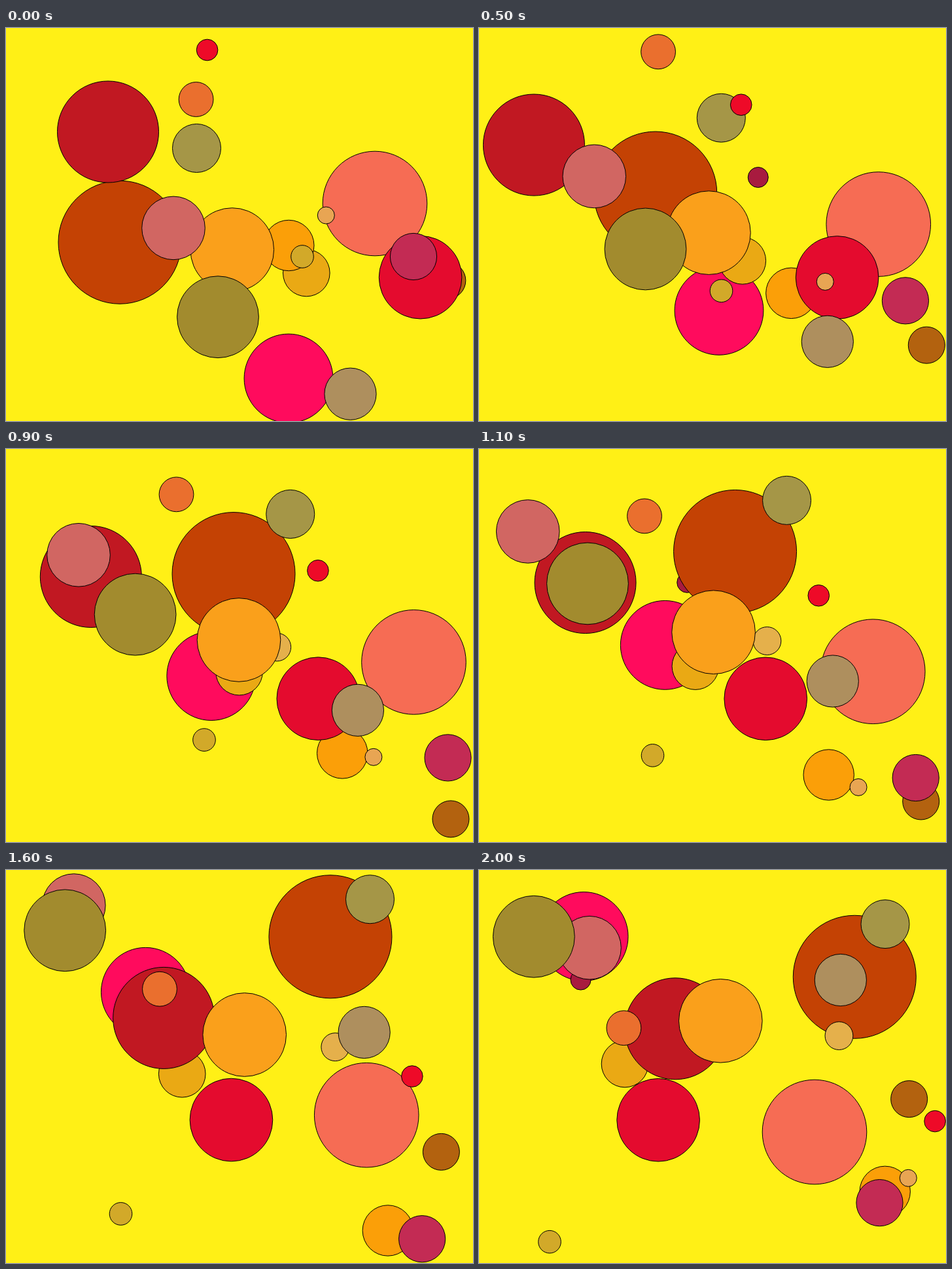
Animation of 714 by 600 pixels, one loop 2.1 s. Source, as an HTML page with a canvas:

```html
<!DOCTYPE html>
<html lang="en">
<head>
<meta charset="utf-8">
<title>Bouncing circles</title>
<style>
  html, body { margin: 0; width: 100%; height: 100%; overflow: hidden; background: #fff016; }
  canvas { display: block; }
</style>
</head>
<body>
<canvas id="stage" width="714" height="600"></canvas>
<script>
const W = 714, H = 600, STEP_MS = 100;
const ctx = document.getElementById('stage').getContext('2d');

// Physics ticks elapsed at each displayed step
const ticks = [0, 2, 4, 6, 9, 11, 13, 16, 18, 20, 23, 25, 28, 30, 32, 35, 37, 40, 42, 44, 46];

// Back to front: colour, outer radius, x, y, vx, vy
const balls = [
  ['#ff0b5d', 68.4, 432, 535, -5.91, -9.425],
  ['#a81b3f', 16, 512, 247, -7.75, -1.726],
  ['#eaa914', 36.3, 459.3, 374, -5.137, -1.696],
  ['#b3620f', 28.5, 674.85, 385.5, 0.86, 8.97],
  ['#fb9f08', 39.2, 432.3, 332, 4.096, 6.62],
  ['#f66c54', 80.3, 564, 268, 4.25, 2.87],
  ['#c44204', 94.5, 174, 327.2, 8.702, -6.83],
  ['#e5b04b', 21.9, 309.5, 340.5, 5.238, -1.9],
  ['#c11822', 78, 156, 158.5, -6.55, 1.822],
  ['#e40b2e', 63.8, 633.6, 380.7, -7.815, 0.022],
  ['#faa01b', 64.3, 345.8, 338.5, 0.511, -2.352],
  ['#e8a553', 13.5, 489.3, 286, 3.63, 9.215],
  ['#d16662', 48.8, 256, 305.4, -7.25, -7.18],
  ['#d2a929', 17.8, 453, 349, -7.5, 4.754],
  ['#a28b2e', 62.9, 324, 441.2, -6.32, -9.43],
  ['#ae8f5e', 40.1, 526.5, 558.7, 0.572, 8.88],
  ['#a59647', 37.5, 291.5, 183.5, 7.163, -4.205],
  ['#c32b54', 36.1, 623, 349, 2.63, 6.12],
  ['#ea6f2e', 26.9, 290.6, 109, -1.504, -6.61],
  ['#ee0a28', 16.8, 307.6, 33.5, 8.467, 7.61]
];

// One axis of travel; turns round once a step carries the edge past a wall
function travel(p, v, r, size, n) {
  while (n-- > 0) {
    p += v;
    if (p < r) v = Math.abs(v);
    else if (p > size - r) v = -Math.abs(v);
  }
  return p;
}

function draw(n) {
  ctx.fillStyle = '#fff016';
  ctx.fillRect(0, 0, W, H);
  ctx.strokeStyle = '#000';
  ctx.lineWidth = 1;
  for (const [color, r, x, y, vx, vy] of balls) {
    ctx.beginPath();
    ctx.arc(travel(x, vx, r, W, n), travel(y, vy, r, H, n), r - 0.5, 0, Math.PI * 2);
    ctx.fillStyle = color;
    ctx.fill();
    ctx.stroke();
  }
}

const start = performance.now();
function loop() {
  const step = Math.floor((performance.now() - start) / STEP_MS) % ticks.length;
  draw(ticks[step]);
  requestAnimationFrame(loop);
}
loop();
</script>
</body>
</html>
```
